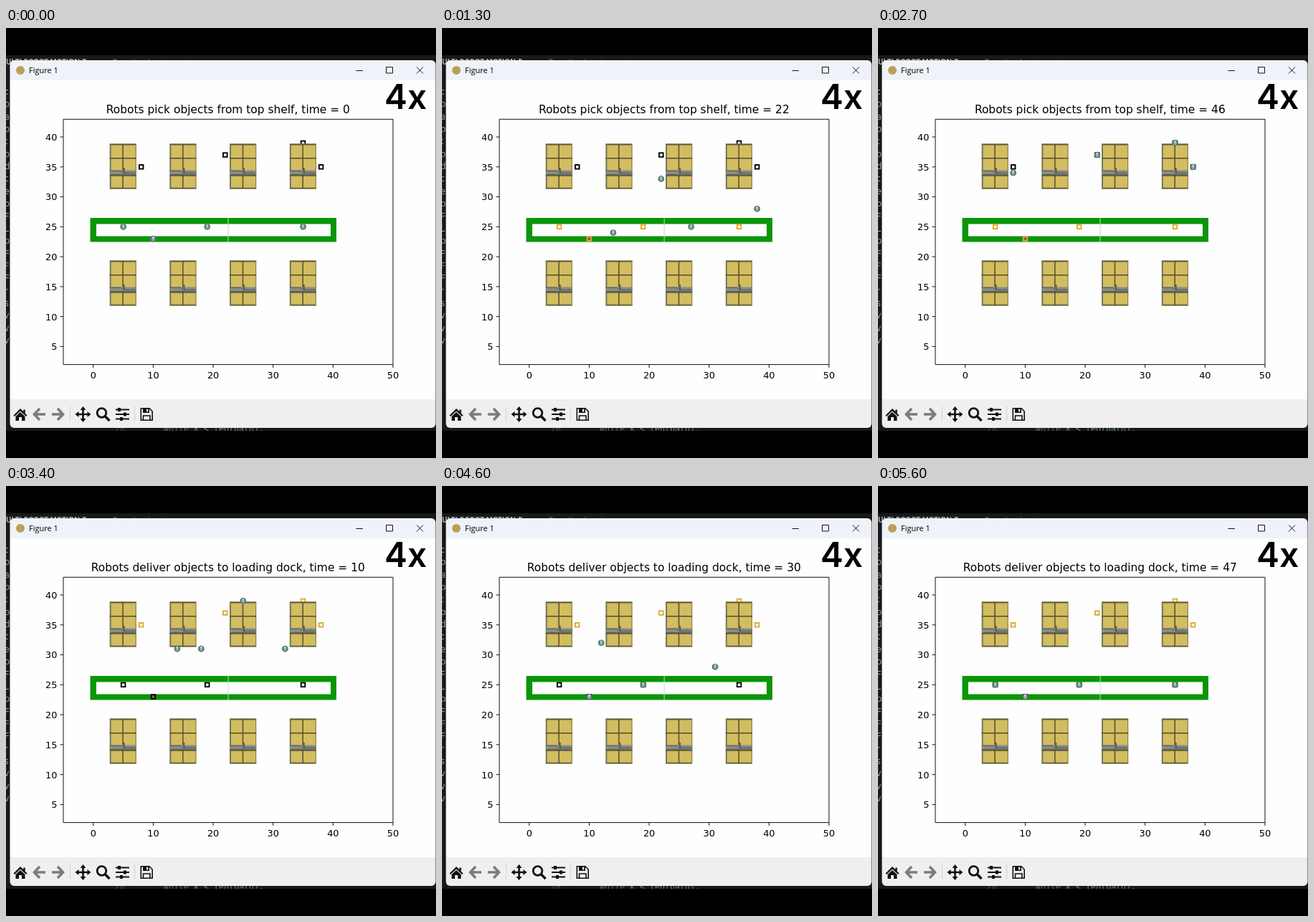
Recreate the animation shown at these times as an HTML page with a canvas. Size 600 by 600 pixels, loop 5.7 s.

```html
<!DOCTYPE html>
<html lang="en">
<head>
<meta charset="utf-8">
<title>Warehouse robots</title>
<style>
html, body { margin: 0; width: 100%; height: 100%; overflow: hidden; background: #000; }
canvas { display: block; width: 600px; height: 600px; }
</style>
</head>
<body>
<canvas id="stage" width="600" height="600"></canvas>
<script>
const c = document.getElementById('stage').getContext('2d');
const LOOP = 5700, SWITCH = 2800;
const px = x => 121.8 + 8.364 * x;
const py = y => 486.2 - 8.354 * y;

// Waypoints on the grid; every robot moves one cell per time unit.
const pick = [
  [[5, 25], [29, 25], [29, 39], [35, 39]],
  [[19, 25], [19, 27], [38, 27], [38, 35]],
  [[35, 25], [35, 24], [4, 24], [4, 30], [8, 30], [8, 35]],
  [[10, 23], [10, 30], [22, 30], [22, 37]]
];
const deliver = [
  [[35, 39], [12, 39], [12, 25], [5, 25]],
  [[38, 35], [38, 31], [19, 31], [19, 25]],
  [[8, 35], [8, 31], [14, 31], [14, 28], [35, 28], [35, 25]],
  [[22, 37], [22, 31], [10, 31], [10, 23]]
];

function along(path, n) {
  for (let i = 1; i < path.length; i++) {
    const [x, y] = path[i - 1], [u, v] = path[i];
    const d = Math.abs(u - x) + Math.abs(v - y);
    if (n <= d) return [x + (u - x) * n / d, y + (v - y) * n / d];
    n -= d;
  }
  return path[path.length - 1];
}

function rect(x, y, w, h, fill) {
  c.fillStyle = fill;
  c.fillRect(x, y, w, h);
}

function text(s, x, y, font, fill = '#000', align = 'left') {
  c.font = font;
  c.fillStyle = fill;
  c.textAlign = align;
  c.fillText(s, x, y);
}

function disc(x, y, r, fill) {
  c.fillStyle = fill;
  c.beginPath();
  c.arc(x, y, r, 0, 7);
  c.fill();
}

function stroke(d, color = '#111', width = 1) {
  c.strokeStyle = color;
  c.lineWidth = width;
  c.stroke(new Path2D(d));
}

function shape(d, fill = '#111') {
  c.fillStyle = fill;
  c.fill(new Path2D(d), 'evenodd');
}

function editor() {
  rect(0, 0, 600, 600, '#000');
  c.save();
  c.beginPath();
  c.rect(0, 38, 600, 524);
  c.clip();
  rect(0, 38, 600, 524, '#191919');
  text('ULTI-ROBOT-MOTION-P', 0, 51, 'bold 9.8px "Open Sans", sans-serif', '#b5b5b5');
  text('path_planning.py >', 163, 51, '11px "Open Sans", sans-serif', '#666');
  disc(152, 46, 3, '#2f6a5c');
  [...'coabtodceoFLpFFFrsvvv'].forEach((s, i) =>
    text(s, -2, 93 + i * 17.35, '12px "Open Sans", sans-serif', i === 14 ? '#8d9a60' : '#a8a8a8'));
  const mono = '11.6px "DejaVu Sans Mono", monospace';
  c.globalAlpha = 0.7;
  text('28', 152, 563, mono, '#666');
  [['while', 0, '#a878a4'], ['k', 6, '#7fb3cf'], ['<', 8, '#aaa'], ['len', 10, '#b9b98a'],
   ['(', 13, '#aaa'], ['path', 14, '#7fb3cf'], ['):', 18, '#aaa']]
    .forEach(([s, col, fill]) => text(s, 220 + col * 7, 563, mono, fill));
  c.restore();
}

function toolbar() {
  // home
  shape('M20 531 L10.5 540.5 L12 542 L20 534.5 L28 542 L29.5 540.5 L26.7 537.7 V532.5 H24.3 V535.3 Z');
  shape('M20 536 L13.5 542 V548 H18 V543 H22 V548 H26.5 V542 Z');
  // back, forward
  stroke('M55 539 H40 M47 531 L39.5 539 L47 547', '#7c7c7c', 3.6);
  stroke('M64 539 H79 M72 531 L79.5 539 L72 547', '#7c7c7c', 3.6);
  stroke('M89.5 527 V549 M179.5 527 V549', '#d4d4d4');
  // pan
  stroke('M99 539 H116 M107.5 530.5 V547.5', '#111', 2.6);
  shape('M107.5 528 l4 5 h-8z M107.5 550 l4 -5 h-8z M96.5 539 l5 -4 v8z M118.5 539 l-5 -4 v8z');
  // zoom
  c.beginPath();
  c.arc(133.5, 537, 6.3, 0, 7);
  c.strokeStyle = '#111';
  c.lineWidth = 2.8;
  c.stroke();
  stroke('M138 541.5 L144.5 548', '#111', 3.6);
  // sliders
  stroke('M153 532.5 H172 M153 539 H172 M153 545.5 H172', '#111', 2);
  rect(156, 530, 4, 5, '#111');
  rect(164, 536.5, 4, 5, '#111');
  rect(159, 543, 4, 5, '#111');
  // save
  stroke('M188.3 530.8 H200 L204.2 535 V547.2 H188.3 Z M191.5 547 V541 H201 V547', '#111', 1.6);
  shape('M191 530 H200 V537 H191 Z M196 531.5 H198.3 V535.5 H196 Z');
}

function figureWindow() {
  c.save();
  c.beginPath();
  c.roundRect(5.5, 45, 594, 513, 6);
  c.clip();
  rect(5, 45, 595, 28, '#eff3f9');
  rect(5, 73, 595, 445, '#fefefe');
  rect(5, 518, 595, 40, '#efeff0');
  c.restore();
  disc(20, 59, 6, '#b9a05a');
  text('Figure 1', 32, 63, '11px "Open Sans", sans-serif');
  stroke('M488.5 59.5 H498 M530.5 54.5 H539.5 V63 H530.5 Z M573 54.5 L582 63.5 M582 54.5 L573 63.5');
  toolbar();
}

function axes() {
  const font = '12.9px "DejaVu Sans", sans-serif';
  stroke('M80 127.3 H540 V469.6 H80 Z', '#111');
  for (let x = 0; x <= 50; x += 10) {
    stroke(`M${px(x)} 469.6 v4.5`, '#111');
    text(x, px(x), 489, font, '#000', 'center');
  }
  for (let y = 5; y <= 40; y += 5) {
    stroke(`M80 ${py(y)} h-4.5`, '#111');
    text(y, 71.5, py(y) + 4.9, font, '#000', 'right');
  }
}

function dock() {
  rect(117.5, 265, 343.5, 33.5, '#0a9608');
  rect(126, 273.5, 327, 17, '#fefefe');
  rect(309.6, 265, 1, 33.5, '#b9e0b5');
}

function shelf(x, y) {
  rect(x, y + 0.5, 37, 63, '#d2bd60');
  stroke(`M${x} ${y + 1.5} h37 M${x} ${y + 62.6} h37`, '#5c5a3c', 1.8);
  stroke(`M${x + 0.9} ${y + 1} v62`, '#6d705a', 1.8);
  stroke(`M${x + 36.4} ${y + 1} v62`, '#8f8350', 1.2);
  stroke(`M${x + 18.3} ${y + 1} v62 M${x} ${y + 20.7} h37 M${x} ${y + 45} h37`, '#594c2c', 1.5);
  rect(x, y + 37.5, 37, 6.5, '#868d88');
  stroke(`M${x} ${y + 38.2} h16 l3 3 h18 M${x + 1} ${y + 43.6} h35`, '#4b5558');
  stroke(`M${x + 20} ${y + 34} v8`, '#4b5038', 1.5);
}

function marker([x, y], color) {
  const u = px(x), v = py(y);
  rect(u - 3, v - 3, 6, 6, y === 23 ? '#8d554c' : '#fefefe');
  c.strokeStyle = color;
  c.lineWidth = 1.9;
  c.strokeRect(u - 2.8, v - 2.8, 5.6, 5.6);
}

function robot([x, y]) {
  const u = px(x), v = py(y);
  disc(u, v, 4.4, y === 23 ? '#66707a' : '#557a78');
  disc(u, v - 1.9, 1.3, '#d5e3e2');
  stroke(`M${u - 2.4} ${v} h4.8 M${u} ${v - 1} v2 l-1.8 2.2 M${u} ${v + 1} l1.8 2.2`, '#c3d6d4', 0.9);
}

function draw(ms) {
  const picking = ms < SWITCH;
  const n = picking ? Math.round(ms * 0.0172) : Math.floor((ms - SWITCH) * 0.0169);
  const paths = picking ? pick : deliver;
  editor();
  figureWindow();
  dock();
  paths.forEach(p => {
    if (n) marker(p[0], picking ? '#eba52c' : '#dcae2c');
    marker(p[p.length - 1], '#000');
  });
  for (let i = 0; i < 4; i++) {
    shelf(144.8 + i * 83.7, 161);
    shelf(144.8 + i * 83.7, 324);
  }
  axes();
  paths.forEach(p => robot(along(p, n)));
  const task = picking ? 'pick objects from top shelf' : 'deliver objects to loading dock';
  text(`Robots ${task}, time = ${n}`, 309.8, 118.7, '15.45px "DejaVu Sans", sans-serif', '#000', 'center');
  text('4x', 587.3, 112.8, '600 48px Inter, sans-serif', '#000', 'right');
}

const start = performance.now();
function tick() {
  const ms = (performance.now() - start) % LOOP;
  draw(Math.floor(ms / 100) * 100);
  requestAnimationFrame(tick);
}
tick();
</script>
</body>
</html>
```
